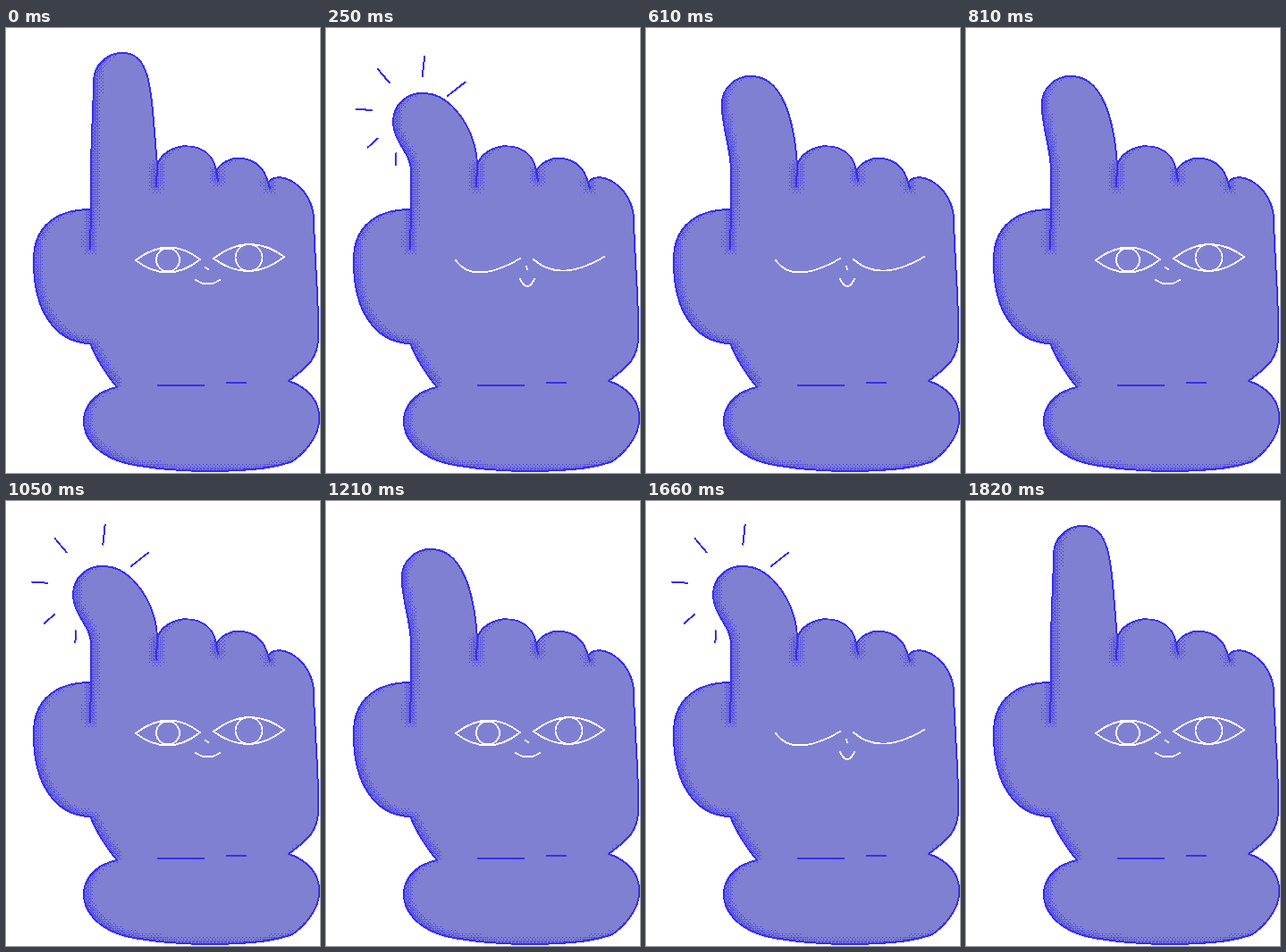
Write an HTML page with a canvas that moves like this. It is 351 px wide and 498 px high and loops after 1900 ms.

```html
<!DOCTYPE html>
<html lang="en">
<head>
<meta charset="utf-8">
<title>Tapping finger</title>
<style>
  html, body { margin: 0; width: 100%; height: 100%; overflow: hidden; background: #fff; }
  canvas { display: block; width: 351px; height: 498px; image-rendering: pixelated; }
</style>
</head>
<body>
<canvas id="stage" width="351" height="498"></canvas>
<script>
const W = 351, H = 498, LOOP = 1900, TICK = 40;
const WHITE = [255, 255, 255], FILL = [128, 128, 210], INK = [56, 48, 232];
const HALF_BENT = 0.58;
const stage = document.getElementById('stage').getContext('2d');

const KNUCKLES = 'C176 126 231 122 235 161 C243 140 285 138 293 173 C305 156 344 178 344 215';
const PALM_RIGHT = 'C345 260 350 310 349 345 C349 372 335 380 316 395';
const CUFF = 'C360 410 362 455 320 485 C280 500 190 497 150 490 C71 480 71 412 124 402';
const THUMB = 'Q104 378 94 353 C56 352 31 318 31 262 C30 222 56 203 95 203';
const CREASES = new Path2D('M95 203 94 247 M169 154 168 177 M235 161 237 171 M293 173 295 179');
const WRIST = new Path2D('M170 400H221M247 397H268');

// When the finger leaves and returns, and when the eyes shut and open.
const TAPS = [
  { bend: 210, back: 650, shut: 210, open: 730 },
  { bend: 810, back: 1250, shut: 0, open: 0 },
  { bend: 1420, back: 1820, shut: 1380, open: 1820 }
];

const layer = document.createElement('canvas');
layer.width = W;
layer.height = H;
const g = layer.getContext('2d', { willReadFrequently: true });

// The fingertip slides down and left as bend goes from 0 to 1.
function handPath(bend) {
  const x = 130 - 23 * bend, y = 60 + 45 * bend;
  const left = x - 32, top = y - 32;
  const finger = `M95 203 V160 C95 ${130 + 10 * bend} ${left} ${y + 22} ${left} ${y}
    C${left} ${y - 18} ${x - 18} ${top} ${x} ${top}
    C${x + 34} ${top - 1} ${162 + 6 * bend} ${75 + 40 * bend} 169 154`;
  return new Path2D([finger, KNUCKLES, PALM_RIGHT, CUFF, THUMB, 'Z'].join(' '));
}

// Alpha values of one drawing pass.
function coverage(draw) {
  g.clearRect(0, 0, W, H);
  g.save();
  g.lineCap = g.lineJoin = 'round';
  g.lineWidth = 2;
  draw();
  g.restore();
  return g.getImageData(0, 0, W, H).data;
}

// A curve that sags by depth between two points.
function sag(x0, y0, x1, y1, depth, skew = 0) {
  g.beginPath();
  g.moveTo(x0, y0);
  g.quadraticCurveTo((x0 + x1) / 2 + skew, (y0 + y1) / 2 + 2 * depth, x1, y1);
  g.stroke();
}

function openEye(x0, y0, x1, y1, depth, radius) {
  sag(x0, y0, x1, y1, depth);
  sag(x0, y0, x1, y1, -depth);
  g.beginPath();
  g.arc((x0 + x1) / 2, (y0 + y1) / 2, radius, 0, 2 * Math.PI);
  g.stroke();
}

function drawFace(closed) {
  g.lineWidth = 1.8;
  if (closed) {
    sag(145, 260, 217, 258, 14.5, -16);
    sag(232, 259, 311, 256, 14, -10);
    sag(217, 281, 233, 281, 8);
    sag(224, 267, 225, 270, 0);
  } else {
    openEye(145, 260, 217, 259, 14, 13);
    openEye(232, 258, 311, 256, 15, 15);
    sag(212, 282, 239, 282, 4.5);
    sag(223, 268, 226, 270, 0);
  }
}

// Six rays fan out around the fingertip, longer towards the top right.
function drawMarks(phase) {
  const rad = Math.PI / 180;
  for (let i = 0; i < 6; i++) {
    const place = (121 + 31 * i + 1.7 * i * i) * rad;
    const aim = (92 + 46 * i) * rad;
    const radius = 57 + 14 * Math.sin(Math.PI * i / 5);
    const half = (13 + 2.4 * i) / 2;
    const x = 107 + radius * Math.cos(place), y = 103 + radius * Math.sin(place);
    const dx = Math.cos(aim), dy = Math.sin(aim);
    sag(x + dx * (phase - half), y + dy * (phase - half),
        x + dx * (phase + half), y + dy * (phase + half), 0);
  }
}

// Shadow inside the left and lower edges and beside the creases.
function drawShade(hand) {
  g.globalAlpha = 0.5;
  g.fill(hand);
  g.globalAlpha = 1;
  g.globalCompositeOperation = 'destination-out';
  g.filter = 'blur(3px)';
  g.translate(6, -3);
  g.fill(hand);
  g.translate(-6, 3);
  g.globalCompositeOperation = 'source-over';
  g.globalAlpha = 0.4;
  g.lineWidth = 11;
  g.stroke(CREASES);
}

// Ordered 4x4 dither level, 0 to 255.
function ditherLevel(x, y) {
  const cell = (a, b) => 2 * (a ^ b) + b;
  return (4 * cell(x & 1, y & 1) + cell(x >> 1 & 1, y >> 1 & 1) + 0.5) * 16;
}

function render({ bend, closed, phase }) {
  const hand = handPath(bend);
  const body = coverage(() => g.fill(hand));
  const shade = coverage(() => drawShade(hand));
  const ink = coverage(() => {
    [hand, CREASES, WRIST].forEach(path => g.stroke(path));
    if (phase !== null) drawMarks(phase);
  });
  const face = coverage(() => drawFace(closed));

  const image = stage.createImageData(W, H);
  for (let i = 0; i < W * H; i++) {
    const a = i * 4 + 3;
    let color = WHITE;
    if (face[a] > 127) color = WHITE;
    else if (ink[a] > 127) color = INK;
    else if (body[a] > 127) color = shade[a] > ditherLevel(i % W, Math.floor(i / W)) ? INK : FILL;
    image.data.set(color, i * 4);
    image.data[a] = 255;
  }
  return image;
}

function stateAt(time) {
  const closed = TAPS.some(tap => time >= tap.shut && time < tap.open);
  const tap = TAPS.find(tap => time >= tap.bend && time < tap.back);
  if (!tap) return { bend: 0, closed, phase: null };
  const step = Math.floor((time - tap.bend) / TICK);
  const end = (tap.back - tap.bend) / TICK - 1;
  if (step === 0 || step === end) return { bend: HALF_BENT, closed, phase: null };
  return { bend: 1, closed, phase: step - 6 };
}

const cache = new Map();
let shown = '';

function frame() {
  const state = stateAt(performance.now() % LOOP);
  const key = Object.values(state).join();
  if (key !== shown) {
    if (!cache.has(key)) cache.set(key, render(state));
    stage.putImageData(cache.get(key), 0, 0);
    shown = key;
  }
  requestAnimationFrame(frame);
}
frame();
</script>
</body>
</html>
```
